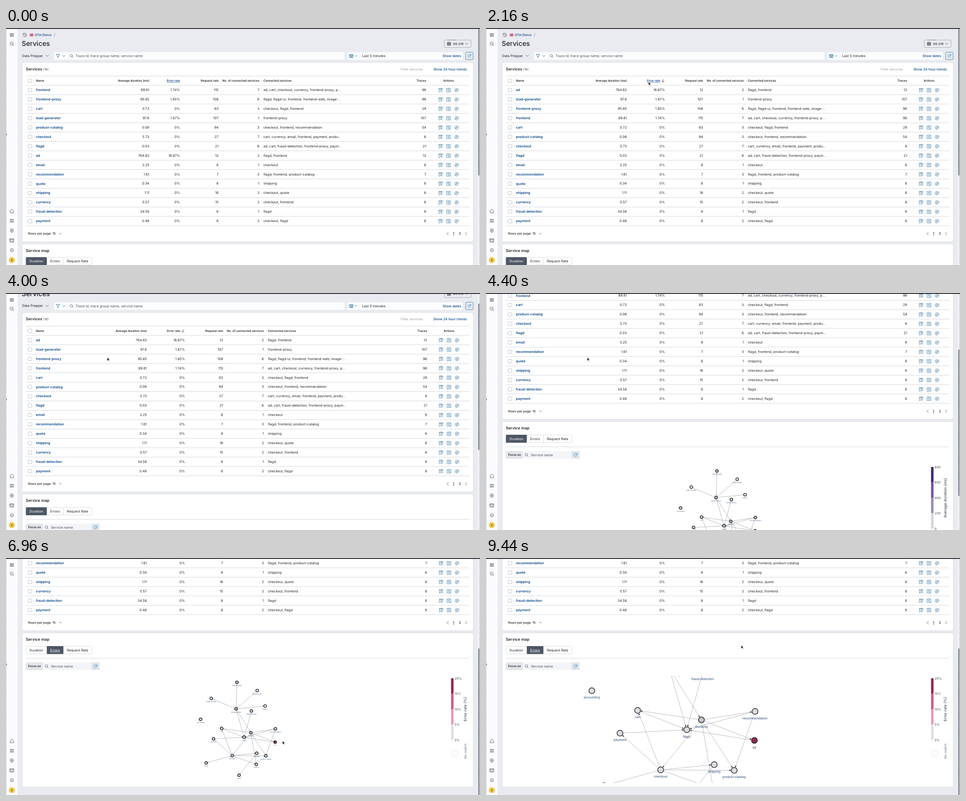
These frames come from a looping animation (1057x530 px, 9.52 s). An HTML page:

```html
<!DOCTYPE html>
<html lang="en">
<head>
<meta charset="utf-8">
<title>Services</title>
<style>
  html, body { margin: 0; width: 100%; height: 100%; overflow: hidden; background: #e9ebf0; }
  svg { display: block; width: 1057px; height: 530px; }
  text { font-family: Inter, "Open Sans", sans-serif; text-rendering: geometricPrecision; white-space: pre; }
  .map text { font-family: "Liberation Sans", Arial, sans-serif; }
  .map circle, .map line { vector-effect: non-scaling-stroke; }
</style>
</head>
<body>
<svg id="stage" viewBox="0 0 1057 530" xmlns="http://www.w3.org/2000/svg"></svg>
<script>
const LOOP = 9520, STEP = 80, MAX_SCROLL = 315.5;
const INK = '#20242b', LINK = '#0b478b', LINE = '#c9ccd3', ICON = '#33719f', GREY = '#4a505a';
const stage = document.getElementById('stage');

// ---- drawing helpers ----
function el(parent, tag, attrs = {}, text) {
  const node = document.createElementNS('http://www.w3.org/2000/svg', tag);
  for (const k in attrs) node.setAttribute(k, attrs[k]);
  if (text !== undefined) node.textContent = text;
  return parent.appendChild(node);
}
const group = (p, attrs) => el(p, 'g', attrs);
const rect = (p, x, y, w, h, fill, more = {}) =>
  el(p, 'rect', { x, y, width: w, height: h, fill, ...more });
const hline = (p, x1, x2, y, stroke = LINE) =>
  el(p, 'path', { d: `M${x1},${y}H${x2}`, stroke, 'stroke-width': 0.8 });
// y is the middle of the capitals
function label(p, str, x, y, size = 7.55, fill = INK, weight = 400, anchor = 'start') {
  return el(p, 'text', { x, y: y + size * 0.36, 'font-size': size, fill,
    'font-weight': weight, 'text-anchor': anchor }, str);
}
const icon = (p, x, y, d, stroke = GREY, width = 0.9) =>
  el(p, 'path', { d, transform: `translate(${x},${y})`, fill: 'none', stroke,
    'stroke-width': width, 'stroke-linecap': 'round', 'stroke-linejoin': 'round' });
const ring = (r, x = 0, y = 0) =>
  `M${x + r},${y}A${r},${r} 0 1 1 ${x - r},${y}A${r},${r} 0 1 1 ${x + r},${y}`;

const CHEVRON = 'M-3,-1.5L0,1.5L3,-1.5';
const LENS = ring(2.8, -0.5, -0.5) + 'M1.6,1.6L3.8,3.8';
const RELOAD = 'M3,-1.2A3.2,3.2 0 1 0 3.1,1.2M3.4,-3.4V-1H1';
const CALENDAR = 'M-3.7,-3H3.7V3.7H-3.7ZM-3.7,-1H3.7M-1.8,-4V-2.2M1.8,-4V-2.2M-2,1H2M-2,2.5H2';
const ACTIONS = [
  'M-1.5,4H-3.8V-4H3.8V-1.5M-3.8,-2.4H3.8' + ring(1.9, 1, 1.2) + 'M2.4,2.6L4,4.2',
  'M-4,-4H4V4H-4ZM-2.2,-1.8H2M-2.2,0H.5M-.5,1.9H2.4',
  ring(4) + 'M1.9,-1.9L.8,.8L-1.9,1.9L-.8,-.8Z'
];

const page = group(stage);
rect(page, 0, 0, 1057, 850, '#e9ebf0');

// ---- page header ----
icon(page, 42, 15.5, 'M-3.6,-1.8A4,4 0 1 1 -3.9,.9M-4,-3.6V-1.6H-2M0,-2V.3L1.6,1.3');
icon(page, 57, 15.5, ring(1.6, -2, 1.4) + ring(1.6, 2, 1.4) +
  'M-3.4,.6L-2.4,-2.8H-1V.6M3.4,.6L2.4,-2.8H1V.6M-1,-.8H1', '#c23a64', 1.1);
label(page, 'OTel Demo', 64, 15.5, 7.2, LINK, 500);
label(page, '/', 107, 15.5, 7.6, GREY);
label(page, 'Services', 35, 35, 15.1, INK, 500);

rect(page, 977.5, 27, 59.5, 16.5, '#e9ebf0', { rx: 2, stroke: '#9aa0aa', 'stroke-width': 0.8 });
rect(page, 983, 25, 23, 4, '#e9ebf0');
label(page, 'DATA SOURCE', 984, 27, 3, GREY, 500);
icon(page, 988, 35.3, 'M-3,-3.2H3V3.2H-3ZM-3,-1H3M-3,1.1H3', INK, 1);
label(page, 'OS 219', 997, 35.3, 6.9, INK, 500);
icon(page, 1027, 35.3, CHEVRON, GREY);

label(page, 'Data Prepper', 36, 62, 7.5);
icon(page, 92, 62, CHEVRON);
rect(page, 107, 54, 648, 17, '#fbfcfd', { rx: 2 });
rect(page, 137, 54, 0.8, 17, '#e4e7ec');
icon(page, 116, 62.5, 'M-3.7,-3.7H3.7L1,0V3.6L-1,2.4V0Z', ICON);
icon(page, 129, 62.5, CHEVRON, ICON);
icon(page, 146, 62.5, LENS, GREY, 0.8);
label(page, 'Trace Id, trace group name, service name', 155, 62.3, 7.6, GREY);
rect(page, 761, 54, 258, 17, '#fbfcfd', { rx: 2 });
rect(page, 788.5, 54, 0.8, 17, '#e4e7ec');
icon(page, 770, 62.5, CALENDAR, ICON);
icon(page, 780.5, 62.5, 'M-2.4,-1.2L0,1.2L2.4,-1.2', ICON);
label(page, 'Last 5 minutes', 794, 62.3, 7.6);
label(page, 'Show dates', 973.5, 62.3, 7.5, LINK, 500);
rect(page, 1025, 54, 16.7, 16.7, '#e3ebf3', { rx: 2, stroke: '#34719f', 'stroke-width': 0.8 });
icon(page, 1033.3, 62.3, RELOAD, ICON, 0.8);

function panel(y, h) {
  rect(page, 36, y, 1006, h, '#fff', { rx: 3.5, stroke: '#d5d8df', 'stroke-width': 0.8 });
}

// ---- services table ----
panel(77, 401);
label(page, 'Services', 44.3, 91.7, 8.6, INK, 600);
label(page, '(16)', 83, 92, 7, GREY);
label(page, 'Filter services', 880, 92, 7.5, '#989ea8');
label(page, 'Show 24 hour trends', 953, 92, 7.5, LINK, 500);

const TOP = 128.2, ROW = 20.93;
const rowGlow = rect(page, 44, TOP, 989, ROW, '#eceef2');
hline(page, 44, 1033, 107.4);
for (let i = 0; i <= 15; i++) {
  hline(page, 44, 1033, TOP + i * ROW);
  rect(page, 49.4, (i ? TOP + (i - 0.5) * ROW : 118) - 4, 8.2, 8.2, '#fff',
    { rx: 1.6, stroke: '#aab0ba', 'stroke-width': 0.8 });
}

const services = `frontend|89.81|1.74|115|7|ad, cart, checkout, currency, frontend-proxy, p...|96
frontend-proxy|95.85|1.85|108|6|flagd, flagd-ui, frontend, frontend-web, image-...|96
cart|0.72|0|63|3|checkout, flagd, frontend|29
load-generator|97.8|1.87|107|1|frontend-proxy|107
product-catalog|0.08|0|94|3|checkout, frontend, recommendation|54
checkout|5.73|0|27|7|cart, currency, email, frontend, payment, produ...|6
flagd|0.03|0|21|6|ad, cart, fraud-detection, frontend-proxy, paym...|21
ad|764.63|16.67|12|2|flagd, frontend|12
email|3.25|0|6|1|checkout|6
recommendation|1.61|0|7|3|flagd, frontend, product-catalog|7
quote|0.34|0|6|1|shipping|6
shipping|1.11|0|18|2|checkout, quote|6
currency|0.57|0|15|2|checkout, frontend|6
fraud-detection|34.58|0|6|1|flagd|6
payment|0.48|0|6|2|checkout, flagd|6
accounting|46.86|0|6|0||6`.split('\n').map(s => s.split('|'));

// sort: 0 none, 1 ascending, -1 descending
function buildTable(sort) {
  const g = group(page);
  const x = sort
    ? { avg: 314, err: 399, req: 484, con: 575, list: 584, traces: 939, act: 988 }
    : { avg: 319.5, err: 388, req: 474, con: 565, list: 574, traces: 937, act: 987 };
  const head = (s, hx, anchor) => label(g, s, hx, 118, 6.5, INK, 600, anchor);
  head('Name', 66.7, 'start');
  head('Average duration (ms)', x.avg, 'end');
  const errHead = head('Error rate', sort ? 388.5 : x.err, 'end');
  if (sort) icon(g, 394.7, 118, `M0,3V-3M-2.6,${-0.4 * sort}L0,${-3 * sort}L2.6,${-0.4 * sort}`, GREY);
  head('Request rate', x.req, 'end');
  head('No. of connected services', x.con, 'end');
  head('Connected services', x.list, 'start');
  head('Traces', x.traces, 'end');
  head('Actions', x.act, 'middle');
  const rows = [...services].sort((a, b) => sort * (a[2] - b[2])).slice(0, 15);
  rows.forEach(([name, avg, err, req, con, list, traces], i) => {
    const y = TOP + (i + 0.5) * ROW - 0.2;
    const num = (s, nx) => label(g, s, nx, y, 7.55, INK, 400, 'end');
    label(g, name, 66.7, y, 7.65, LINK, 600);
    num(avg, x.avg);
    num(err + '%', x.err);
    num(req, x.req);
    num(con, x.con);
    label(g, list, x.list, y, 7.5);
    num(traces, x.traces);
    ACTIONS.forEach((d, k) => icon(g, x.act + (k - 1) * 17.8, y + 0.5, d, ICON, 0.8));
  });
  return { g, errHead };
}
const tables = [0, 1, -1].map(buildTable);

label(page, 'Rows per page: 15', 49.5, 459.7, 7.05, INK, 500);
icon(page, 121.5, 460, 'M-2.4,-1.2L0,1.2L2.4,-1.2');
icon(page, 985, 460, 'M1.5,-3L-1.5,0L1.5,3');
label(page, '1', 998, 459.7, 7.5, LINK, 600, 'middle').setAttribute('text-decoration', 'underline');
label(page, '2', 1012, 459.7, 7.5, INK, 500, 'middle');
icon(page, 1026, 460, 'M-1.5,-3L1.5,0L-1.5,3');

// ---- service map panel ----
panel(483, 344.7);
const lower = group(page, { transform: `translate(0,${MAX_SCROLL})` });
label(lower, 'Service map', 44.3, 182, 8.7, INK, 600);
rect(lower, 44.6, 197.3, 146.6, 17.2, '#fff', { rx: 2, stroke: '#cfd3da', 'stroke-width': 0.8 });
const tabs = [['Duration', 44.4, 91], ['Errors', 91, 128], ['Request Rate', 128, 191.4]].map(([s, a, b]) => {
  const box = rect(lower, a, 197, b - a, 17.8, '#4d5664', { rx: 1.5 });
  return { box, text: label(lower, s, (a + b) / 2, 206, 7.65, INK, 400, 'middle') };
});
rect(lower, 127.8, 197.3, 0.8, 17.2, '#cfd3da');
hline(lower, 44.5, 1032.5, 224);
rect(lower, 44.5, 233.5, 164, 17, '#f4f5f8', { rx: 2 });
rect(lower, 44.5, 233.5, 37.5, 17, '#e3e5ea', { rx: 2 });
rect(lower, 190.5, 233.5, 18, 17, '#dfe5ed', { rx: 2 });
label(lower, 'Focus on', 49.5, 242, 6.5, INK, 600);
icon(lower, 90.5, 242, LENS, GREY, 0.8);
label(lower, 'Service name', 100, 242, 7.6, GREY);
icon(lower, 199.5, 242, RELOAD, ICON, 0.8);

function buildLegend(colors, ticks, title) {
  const g = group(lower);
  colors.forEach((c, i) => rect(g, 992.4, 269 + i * 34.5, 5.6, 34.6, c));
  ticks.forEach((s, i) => label(g, s, 1000.3, 269 + i * 34.5, 7.2, GREY));
  label(group(g, { transform: 'translate(1024,338) rotate(-90)' }), title, 0, 0, 8.4, GREY, 500, 'middle');
  return g;
}
const legends = [
  buildLegend(['#47296f', '#7656a1', '#9d8eb2', '#d6d5da'], ['800', '600', '400', '200', '0'], 'Average duration (ms)'),
  buildLegend(['#93294f', '#c9617f', '#e6a0b5', '#e0dfe2'], ['20%', '15%', '10%', '5%', '0%'], 'Error rate (%)')
];
el(lower, 'circle', { cx: 1001, cy: 437, r: 7.4, fill: '#fff', stroke: '#d9dbe0', 'stroke-width': 0.9 });
label(group(lower, { transform: 'translate(1024,432) rotate(-90)' }), 'No match', 0, 0, 7.5, '#70757e', 400, 'middle');

// ---- graph ----
const clip = el(el(stage, 'defs'), 'clipPath', { id: 'view' });
rect(clip, 44, 264, 940, 239, '#000');
const map = group(group(lower, { 'clip-path': 'url(#view)' }), { class: 'map' });
const PALE = '#dcdce0', MID = '#c3c3c9', NONE = '#fff';
const nodes = {
  'load-generator': [515, 278, MID], 'frontend-web': [560.2, 296.5, NONE],
  'image-provider': [457.6, 314, NONE], 'frontend-proxy': [513, 337.5, MID],
  'flagd-ui': [577.8, 331, NONE], 'fraud-detection': [547.3, 342, PALE],
  accounting: [433.9, 360.8, PALE], cart: [480.7, 381, PALE],
  frontend: [546, 390.7, MID], recommendation: [600.8, 382, PALE],
  payment: [462.7, 404.3, PALE], flagd: [531, 400.8, PALE],
  ad: [600.2, 411.8, PALE], checkout: [504.3, 442, PALE],
  shipping: [559.1, 436.6, PALE], 'product-catalog': [579.5, 442.5, PALE],
  email: [446.3, 458.2, PALE], currency: [558.1, 461.4, PALE], quote: [519.7, 485.8, PALE]
};
const links = {
  'load-generator': 'frontend-proxy', 'frontend-web': 'frontend-proxy',
  'frontend-proxy': 'image-provider flagd-ui flagd frontend',
  'fraud-detection': 'flagd', cart: 'flagd', payment: 'flagd', ad: 'flagd',
  frontend: 'cart recommendation ad checkout product-catalog currency',
  recommendation: 'flagd product-catalog', shipping: 'quote',
  checkout: 'cart payment shipping product-catalog email currency'
};
for (const from in links) for (const to of links[from].split(' ')) {
  const [x1, y1] = nodes[from], [x2, y2] = nodes[to];
  el(map, 'line', { x1, y1, x2, y2, stroke: '#85888e', 'stroke-width': 0.6 });
  const turn = Math.atan2(y2 - y1, x2 - x1) * 180 / Math.PI;
  el(map, 'path', { d: 'M-3.2,0L-5.2,-.85L-4.8,0L-5.2,.85Z', fill: '#15171b',
    transform: `translate(${x2},${y2}) rotate(${turn})` });
}
const dots = {};
for (const name in nodes) {
  const [cx, cy, fill] = nodes[name];
  dots[name] = el(map, 'circle', { cx, cy, r: 3, fill, stroke: '#24272d', 'stroke-width': 1.5 });
  label(map, name, cx, cy + 6.8, 3.45, '#31527a', 400, 'middle');
}

// ---- side rail, top bar, scrollbar ----
rect(stage, 0, 0, 27, 530, '#fafbfc');
rect(stage, 26.4, 0, 0.7, 530, '#dde0e6');
icon(stage, 13, 15.5, 'M-4,-2.8H4M-4,0H4M-4,2.8H4', INK, 1.1);
icon(stage, 13, 35.3, ring(3.4, -0.5, -0.5) + 'M2,2L4.4,4.4');
icon(stage, 13, 409, 'M-3.6,3.8V-.6L0,-4L3.6,-.6V3.8Z');
icon(stage, 13, 431, [[-2.2, -2.2], [2.2, -2.2], [-2.2, 2.2], [2.2, 2.2]].map(([x, y]) => ring(1.5, x, y)).join(''));
icon(stage, 13, 453, ring(1.5) + 'M-1.8,-3.8H1.8L4,0L1.8,3.8H-1.8L-4,0Z');
icon(stage, 13, 475, 'M-4,-3.8H4V3.8H-4ZM-4,-1.6H4M-2.2,.2L-1,1.2L-2.2,2.2M.4,2.2H2.4');
icon(stage, 13, 497, ring(3.6) + 'M0,-1.7V-1.5M0,-.1V1.8');
el(stage, 'circle', { cx: 13, cy: 519, r: 6.6, fill: '#f0c647' });
label(stage, 't', 13, 518.8, 7.5, INK, 500, 'middle');
rect(stage, 1051, 0, 6, 530, '#eff1f4');
const thumb = rect(stage, 1052.8, 2, 3, 328, '#8b9099', { rx: 1.5 });
for (const x of [0.4, 1056.6])
  el(stage, 'path', { d: `M${x},0V530`, stroke: '#8c9098', 'stroke-width': 0.8, 'stroke-dasharray': '3 2' });
rect(stage, 0, 236.5, 1.6, 3, '#555a63');
rect(stage, 0, 0, 1057, 2, '#2d2f37');

const cursor = el(stage, 'path', { d: 'M0,0V7.6L1.8,6L3.1,8.8L4.4,8.2L3.2,5.5H5.6Z',
  fill: '#0c0c0e', stroke: '#fff', 'stroke-width': 0.7, 'stroke-linejoin': 'round' });

// ---- motion: [ms, values...] ----
const POINTER = [[0, 377, 119], [2080, 377, 119], [2640, 111.5, 145.3], [3440, 111.5, 145.3],
  [3760, 225.8, 144], [5040, 225.8, 144], [5280, 119.6, 211], [5520, 113, 208], [6240, 113, 208],
  [6720, 616.7, 409], [6960, 616.7, 409], [7120, 602, 414], [8400, 602, 414], [8880, 569, 195]];
const SCROLL = [[3840, 0], [4080, 50], [4400, 195.5], [4560, 270], [4720, MAX_SCROLL]];
const ZOOM = [[6960, 1], [7520, 1.9], [7600, 1.9], [8320, 2.18]];
const smooth = u => u * u * (3 - 2 * u);
const linear = u => u;

function at(keys, t, ease) {
  const i = keys.findIndex(k => k[0] > t);
  if (i < 0) return keys[keys.length - 1].slice(1);
  if (i === 0) return keys[0].slice(1);
  const a = keys[i - 1], b = keys[i], u = ease((t - a[0]) / (b[0] - a[0]));
  return a.slice(1).map((v, k) => v + (b[k + 1] - v) * u);
}
const show = (node, on) => node.setAttribute('visibility', on ? 'visible' : 'hidden');
const underline = (node, on) => node.setAttribute('text-decoration', on ? 'underline' : 'none');

function draw(t) {
  const [cx, cy] = at(POINTER, t, smooth);
  const [scroll] = at(SCROLL, t, linear);
  const [zoom] = at(ZOOM, t, smooth);
  cursor.setAttribute('transform', `translate(${cx},${cy})`);
  show(cursor, t >= STEP);
  page.setAttribute('transform', `translate(0,${-scroll})`);
  thumb.setAttribute('y', 2 + scroll * 0.634);
  map.setAttribute('transform', `translate(601.6,415) scale(${zoom}) translate(-601.6,-415)`);

  const sorted = t < 1040 ? 0 : t < 1680 ? 1 : 2;
  const overHead = scroll === 0 && cx > 357 && cx < 400 && cy < 126;
  tables.forEach(({ g, errHead }, i) => {
    show(g, i === sorted);
    errHead.setAttribute('fill', overHead ? LINK : INK);
    underline(errHead, overHead);
  });
  show(rowGlow, scroll === 0 && cy > TOP);

  const errors = t >= 5760;
  const active = errors ? 1 : 0;
  tabs.forEach(({ box, text }, i) => {
    show(box, i === active);
    text.setAttribute('fill', i === active ? '#fff' : INK);
  });
  const overTab = scroll === MAX_SCROLL && cx > 91 && cx < 128 && cy > 196 && cy < 215;
  underline(tabs[1].text, overTab || errors);
  legends.forEach((g, i) => show(g, i === active));
  dots.ad.setAttribute('fill', errors ? '#93294f' : '#3d3354');
}

const start = performance.now();
function tick() {
  const t = (performance.now() - start) % LOOP;
  draw(Math.floor(t / STEP) * STEP);
  requestAnimationFrame(tick);
}
tick();
</script>
</body>
</html>
```
